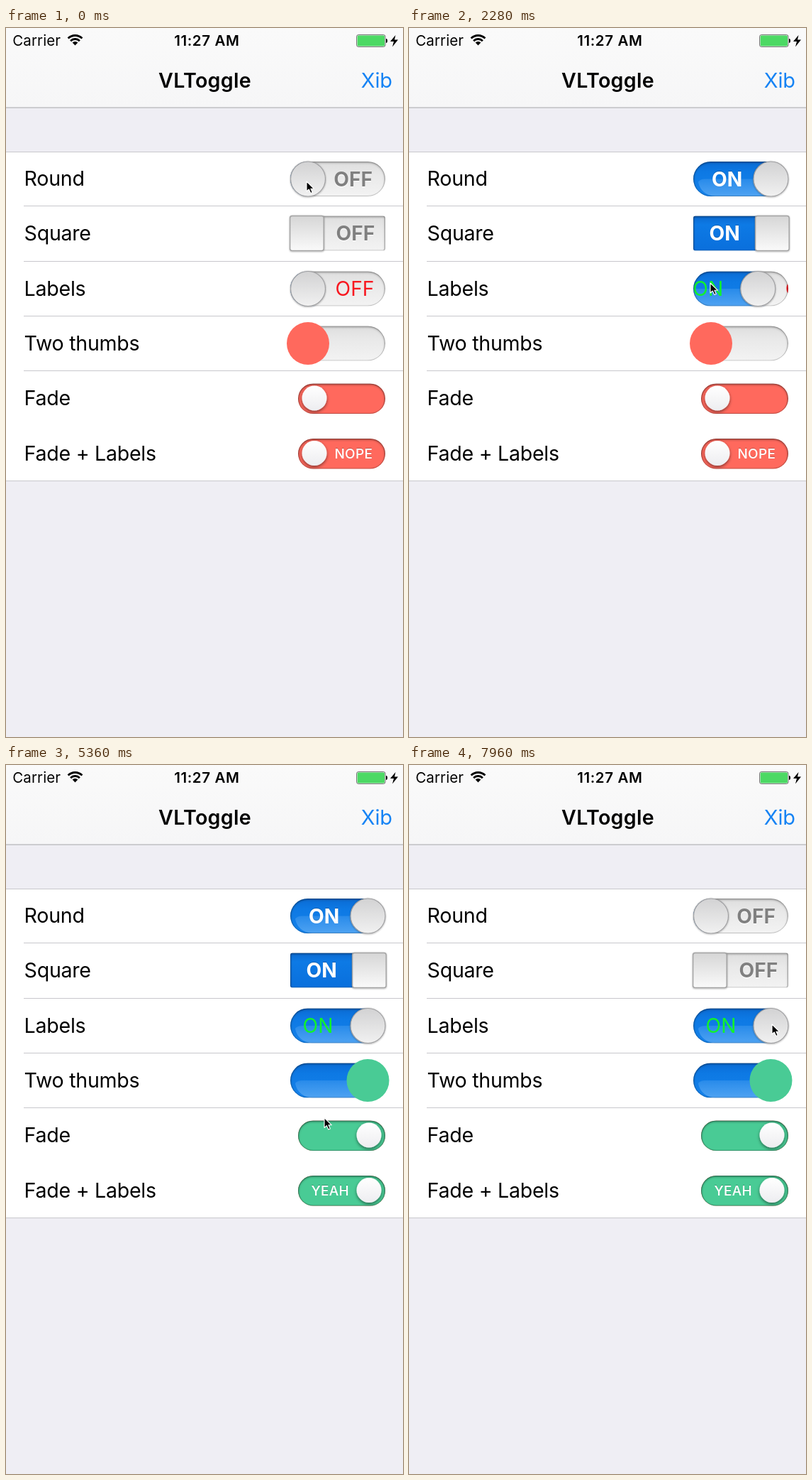
An HTML page that plays this animation: 560x998 px, repeating every 8000 ms.

```html
<!DOCTYPE html>
<html lang="en">
<head>
<meta charset="utf-8">
<title>Switches</title>
<style>
  html, body { margin: 0; width: 100%; height: 100%; overflow: hidden; background: #efeef4; }
  svg { display: block; width: 560px; height: 998px; font-family: Inter, Roboto, sans-serif; }
  .cell { font-size: 28.6px; letter-spacing: -.28px; fill: #000; }
  .mid { text-anchor: middle; }
  .bold { font-weight: 700; }
  .small { font-size: 19px; letter-spacing: .3px; font-weight: 500; fill: #fff; }
</style>
</head>
<body>
<svg id="stage" viewBox="0 0 560 998"></svg>
<script>
const LOOP = 8000, FRAME = 40, SLIDE = 250;
const RED = '#ff695d', GREEN = '#49cb95';

// Times at which each switch is tapped on and, if it happens, off again
const switches = [
  { name: 'Round', y: 212.5, taps: [340, 6443], kind: 'round', bold: true, on: 'ON', off: 'OFF', onX: 448.6, offX: 489.6, onFill: '#fff', offFill: '#808080' },
  { name: 'Square', y: 289, taps: [1220, 7200], kind: 'square', bold: true, on: 'ON', off: 'OFF', onX: 445.2, offX: 493, onFill: '#fff', offFill: '#808080' },
  { name: 'Labels', y: 367, taps: [2105], kind: 'round', on: 'ON', off: 'OFF', onX: 440, offX: 492, onFill: '#12f32a', offFill: '#f81820' },
  { name: 'Two thumbs', y: 444, taps: [2880], kind: 'duo' },
  { name: 'Fade', y: 521.5, taps: [3760], kind: 'fade' },
  { name: 'Fade + Labels', y: 599, taps: [4700], kind: 'fade', on: 'YEAH', off: 'NOPE' }
];

// Pointer stops: time, x, y
const pointer = [
  [0, 424, 216], [450, 424, 216], [900, 428, 280], [1350, 428, 280],
  [1800, 425, 359], [2320, 425, 359], [2700, 425, 436], [3060, 425, 436],
  [3480, 425, 513], [3950, 426, 513], [4400, 429, 580], [4950, 429, 584],
  [6250, 514, 213], [6700, 514, 213], [7050, 513, 288], [7480, 513, 288],
  [7900, 512, 365], [8000, 512, 365]
];

const travelOf = { round: 84.5, duo: 84.5, square: 88, fade: 77 };

const rect = (x, y, w, h, fill, extra = '') =>
  `<rect x="${x}" y="${y}" width="${w}" height="${h}" fill="${fill}" ${extra}/>`;
const circle = (x, y, r, fill, extra = '') =>
  `<circle cx="${x}" cy="${y}" r="${r}" fill="${fill}" ${extra}/>`;
const text = (x, y, s, attrs = '') => `<text x="${x}" y="${y}" ${attrs}>${s}</text>`;
const gradient = (id, ...stops) =>
  `<linearGradient id="${id}" x2="0" y2="1">${stops.map(([at, color, alpha = 1]) =>
    `<stop offset="${at}" stop-color="${color}" stop-opacity="${alpha}"/>`).join('')}</linearGradient>`;
const shadow = (id, dy, blur, color, alpha) =>
  `<filter id="${id}" x="-30%" y="-30%" width="160%" height="160%"><feDropShadow dx="0" dy="${dy}" stdDeviation="${blur}" flood-color="${color}" flood-opacity="${alpha}"/></filter>`;

const innerShade = (x, y, w, h, r, alpha) =>
  rect(x - 1, y, w + 2, h + 3, 'none', `rx="${r}" stroke="#000" stroke-opacity="${alpha}" stroke-width="3.5" filter="url(#soft)"`) +
  rect(x + .5, y + .5, w - 1, h - 1, 'none', `rx="${r}" stroke="#000" stroke-opacity="${alpha * .55}"`);

function thumb(s, i) {
  const { kind, y } = s;
  if (kind === 'round') return circle(426, y, 24.5, 'url(#knob)', 'stroke="#a0a0a2" stroke-width="1.2" filter="url(#drop)"');
  if (kind === 'square') return rect(400.6, y - 24.5, 47.6, 49, 'url(#block)', 'rx="3" stroke="#a2a2a2" stroke-width="1.4" filter="url(#drop)"');
  if (kind === 'duo') return circle(426, y, 30, RED, `id="duo${i}"`);
  return circle(435, y - .5, 17.5, 'url(#pearl)', 'filter="url(#deep)"');
}

function slider(s, i) {
  const square = s.kind === 'square', travel = travelOf[s.kind];
  const top = s.y - 24.5, r = square ? 3 : 24.5;
  const gloss = square ? '' :
    `<path d="M408 ${s.y + 4}q3-4 10-4H520V${top + 49}H432q-20-2-24-20z" fill="url(#gloss)"/>`;
  const label = (x, value, fill, glow) => !value ? '' :
    text(x, s.y + 10, value, `class="mid ${s.bold ? 'bold' : ''}" font-size="28.2" fill="${fill}" ${s.bold ? `filter="url(#${glow})"` : ''}`);
  return `<clipPath id="clip${i}">${rect(401, top, 134, 49, '#fff', `rx="${r}"`)}</clipPath>
    <g clip-path="url(#clip${i})">
      <g id="slide${i}">
        ${rect(300, top, 212, 49, square ? 'url(#blueFlat)' : 'url(#blue)')}${gloss}
        ${rect(512, top, 130, 49, 'url(#offTrack)')}
        ${label(s.onX, s.on, s.onFill, 'dark')}
        ${label(s.offX + travel, s.off, s.offFill, 'light')}
      </g>
      ${innerShade(401, top, 134, 49, r, .32)}
    </g>
    <g id="thumb${i}">${thumb(s, i)}</g>`;
}

function fader(s, i) {
  const top = s.y - 21;
  const label = (x, value, id) => value
    ? text(x, s.y + 7, value, `id="${id}${i}" class="mid small" filter="url(#dark)"`) : '';
  return `<clipPath id="clip${i}">${rect(412, top, 123, 42.5, '#fff', 'rx="21.25"')}</clipPath>
    <g clip-path="url(#clip${i})">
      ${rect(412, top, 123, 43, RED)}
      ${rect(412, top, 123, 43, GREEN, `id="green${i}"`)}
      ${innerShade(412, top, 123, 42.5, 21.25, .4)}
      ${label(490.3, s.off, 'no')}${label(457.3, s.on, 'yes')}
    </g>
    <g id="thumb${i}">${thumb(s, i)}</g>`;
}

const defs = `<defs>
  ${gradient('bar', [0, '#fafafa'], [1, '#f6f6f7'])}
  ${gradient('blue', [0, '#0a6bd4'], [.3, '#0d79e4'], [1, '#1682ea'])}
  ${gradient('blueFlat', [0, '#0b69d0'], [.25, '#0d7ae5'], [1, '#0a6fdc'])}
  ${gradient('gloss', [0, '#66b0f5', .28], [1, '#66b0f5', .7])}
  ${gradient('offTrack', [0, '#dedede'], [.4, '#e9e9e9'], [1, '#f3f3f3'])}
  ${gradient('knob', [0, '#d2d2d3'], [1, '#f1f1f1'])}
  ${gradient('block', [0, '#d6d6d6'], [1, '#fafafa'])}
  ${gradient('pearl', [0, '#ffffff'], [1, '#ededf0'])}
  ${shadow('drop', .6, 1.3, '#000', .38)}
  ${shadow('deep', 2, 2, '#000', .5)}
  ${shadow('dark', -1, .5, '#000', .25)}
  ${shadow('light', 1.2, .3, '#fff', .9)}
  <filter id="soft" x="-10%" y="-20%" width="120%" height="140%"><feGaussianBlur stdDeviation="1.6"/></filter>
</defs>`;

const arc = (r, close = '') => {
  const d = r * Math.SQRT1_2;
  return `M${97.5 - d} ${24.5 - d}A${r} ${r} 0 0 1 ${97.5 + d} ${24.5 - d}${close}`;
};

const statusBar = `
  ${text(9.3, 25.3, 'Carrier', 'font-size="20.5" letter-spacing=".1"')}
  <path d="${arc(14)}${arc(9)}" fill="none" stroke="#000" stroke-width="2.8"/>
  <path d="${arc(5.5, 'L97.5 24.5z')}"/>
  ${text(283.3, 25.3, '11:27 AM', 'class="mid" font-size="20.5" font-weight="600" letter-spacing=".6"')}
  ${rect(494.6, 9.6, 40.4, 16.8, '#fff', 'rx="2.5" stroke="#444" stroke-width=".8"')}
  ${rect(495.6, 10.6, 38.4, 14.8, '#4cd964', 'rx="1.5"')}
  <path d="M536 15q2 0 2 3t-2 3z"/>
  <path d="M549.5 10L542 19h5l-2 7.5 8-10h-5z"/>`;

const navBar = `
  ${rect(0, 0, 560, 112, 'url(#bar)')}
  ${rect(0, 111.5, 560, 1.2, '#b3b3b7')}
  ${statusBar}
  ${text(280.5, 84, 'VLToggle', 'class="mid" font-size="28.6" font-weight="600" letter-spacing=".3"')}
  ${text(544.8, 84, 'Xib', 'text-anchor="end" font-size="29" letter-spacing="-.2" fill="#1583f4"')}`;

const table = `
  ${rect(0, 174, 560, 464, '#fff')}
  ${rect(0, 174, 560, 1, '#c8c7cc')}${rect(0, 637, 560, 1, '#c8c7cc')}
  ${[250, 328, 405, 482].map(y => rect(25, y, 535, 1, '#c8c7cc')).join('')}
  ${switches.map((s, i) => text(25.6, Math.round(s.y - .5) + 10, s.name, 'class="cell"') +
    (s.kind === 'fade' ? fader : slider)(s, i)).join('')}`;

const cursor = `<path id="cursor" d="M0 0V14L3.3 11 5.8 16.5 8.3 15.4 5.9 10.2H10.3z"
  fill="#000" stroke="#fff" stroke-width="1.1" stroke-linejoin="round"/>`;

document.getElementById('stage').innerHTML =
  defs + rect(0, 0, 560, 998, '#efeef4') + navBar + table + cursor;

const el = id => document.getElementById(id);
const ease = u => { u = Math.min(1, Math.max(0, u)); return u * u * (3 - 2 * u); };
const move = (id, x, y = 0) => el(id).setAttribute('transform', `translate(${x} ${y})`);
const fade = (id, alpha) => el(id)?.setAttribute('opacity', alpha);

function pointerAt(t) {
  const k = Math.max(1, pointer.findIndex(stop => stop[0] > t));
  const [t0, x0, y0] = pointer[k - 1], [t1, x1, y1] = pointer[k];
  const u = ease((t - t0) / (t1 - t0));
  return [x0 + (x1 - x0) * u, y0 + (y1 - y0) * u];
}

function draw(t) {
  switches.forEach((s, i) => {
    const [onAt, offAt = Infinity] = s.taps;
    const p = ease((t - onAt) / SLIDE) - ease((t - offAt) / SLIDE);
    const travel = travelOf[s.kind];
    move('thumb' + i, p * travel);
    if (s.kind === 'fade') {
      fade('green' + i, p);
      fade('yes' + i, p);
      fade('no' + i, 1 - p);
    } else {
      move('slide' + i, (p - 1) * travel);
    }
    if (s.kind === 'duo') el('duo' + i).setAttribute('fill', p > .5 ? GREEN : RED);
  });
  move('cursor', ...pointerAt(t));
}

function tick() {
  draw(Math.floor(performance.now() % LOOP / FRAME) * FRAME);
  requestAnimationFrame(tick);
}
tick();
</script>
</body>
</html>
```
